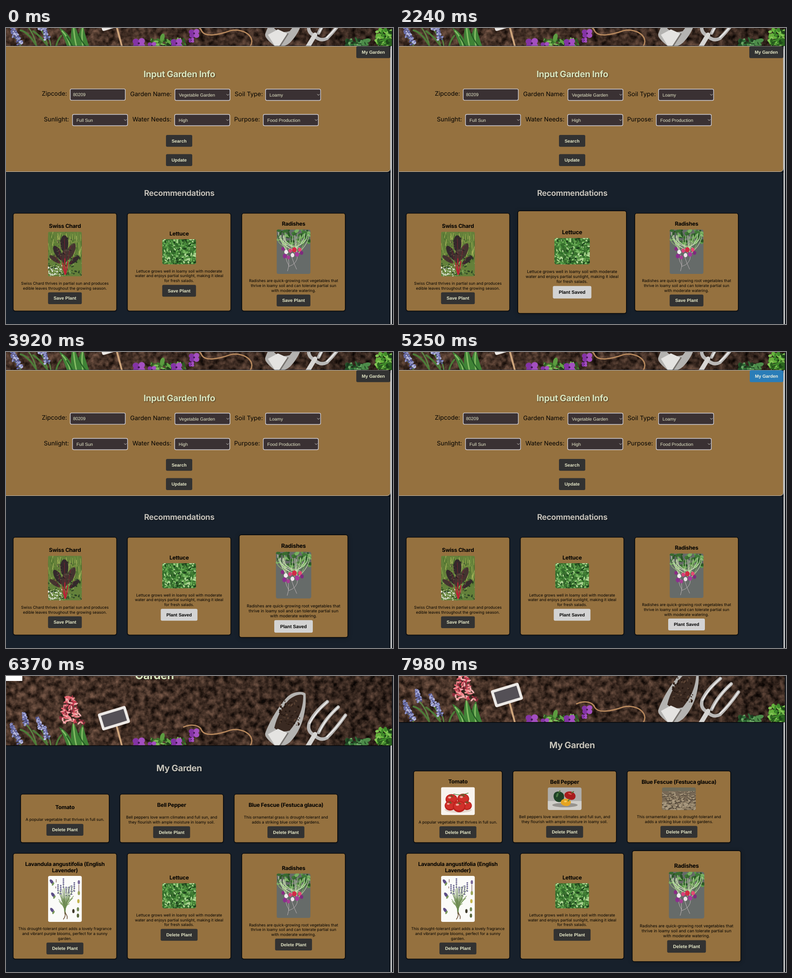
Animation of 854 by 656 pixels, one loop 8 s. Source, as an HTML page:

```html
<!DOCTYPE html>
<html lang="en">
<head>
<meta charset="utf-8">
<title>Garden planner</title>
<style>
  html, body { margin: 0; width: 100%; height: 100%; overflow: hidden; background: #17202b; }
  svg { display: block; }
  text { font-family: Inter, sans-serif; text-anchor: middle; text-rendering: geometricPrecision; }
  .head { font-weight: 700; letter-spacing: -.02em; }
  .glow { filter: drop-shadow(1px 1px 1px rgba(0, 0, 0, .55)); }
  .label { font-size: 13.45px; text-anchor: start; }
  .copy { font-size: 8.6px; }
  .field, .btn { font: 9.92px "Liberation Sans", Arial, sans-serif; }
  .field { text-anchor: start; }
  .btn { font-weight: 700; }
</style>
</head>
<body>
<svg width="854" height="656" viewBox="0 0 854 656">
  <filter id="soil" x="0" y="0" width="1" height="1" color-interpolation-filters="sRGB">
    <feTurbulence type="fractalNoise" baseFrequency=".075" numOctaves="4" seed="4"/>
    <feColorMatrix values=".8 0 0 0 -.15  .62 0 0 0 -.13  .52 0 0 0 -.115  0 0 0 0 1"/>
  </filter>
  <linearGradient id="shade"><stop stop-color="#6a4a38" stop-opacity=".22"/><stop offset="1" stop-color="#120b08" stop-opacity=".3"/></linearGradient>
  <defs id="defs"></defs>
  <g id="scene"></g>
</svg>
<script>
const LOOP = 8000, TICK = 70;
const BROWN = '#95713f', NAVY = '#17202b', DARK = '#323232', CREAM = '#e6e8c8', BLUE = '#2a7db8';
const PIC_W = 74.5;

// ---- drawing helpers ----
const rect = (x, y, w, h, fill, more = '') =>
  `<rect x="${x}" y="${y}" width="${w}" height="${h}" fill="${fill}" ${more}/>`;
const oval = (x, y, rx, ry, fill, turn = 0) =>
  `<ellipse cx="${x}" cy="${y}" rx="${rx}" ry="${ry}" fill="${fill}" transform="rotate(${turn} ${x} ${y})"/>`;
const shape = (d, fill, more = '') => `<path d="${d}" fill="${fill}" ${more}/>`;
const line = (d, color, width) =>
  shape(d, 'none', `stroke="${color}" stroke-width="${width}" stroke-linecap="round"`);
const text = (x, y, str, cls, fill = '#000', size = '') =>
  `<text x="${x}" y="${y}" class="${cls}" fill="${fill}"${size && ` style="font-size:${size}px"`}>${str}</text>`;

function scatter(n, seed, draw) {
  seed *= 7919;
  const next = () => (seed = seed * 16807 % 2147483647) / 2147483647;
  const rnd = (a, b) => +(a + (b - a) * next()).toFixed(1);
  const pick = list => list[Math.floor(next() * list.length)];
  return Array.from({ length: n }, (_, i) => draw(rnd, pick, i)).join('');
}
const blobs = (n, seed, [x, y, w, h], [min, max], colors) => scatter(n, seed, (rnd, pick) =>
  oval(rnd(x, x + w), rnd(y, y + h), rnd(min, max), rnd(min, max) * 0.6, pick(colors), rnd(0, 180)));

// ---- plant pictures, PIC_W wide ----
const pics = {
  chard: [99, rect(0, 0, 75, 99, '#64803a')
    + scatter(150, 5, (rnd, pick) => {
      const x = rnd(0, 75), y = rnd(0, 55);
      return line(`M${x} ${y + 14}l${rnd(-4, 4)} -14`, pick(['#a3b352', '#3f6a26', '#c8c96c', '#7c9c46', '#4c6e2c']), .9);
    })
    + blobs(110, 8, [0, 52, 75, 47], [1, 3.5], ['#33552a', '#5c8840', '#24381f', '#7fa25a', '#2b3f24'])
    + blobs(60, 3, [0, 74, 32, 25], [.8, 2.2], ['#f0f2ea', '#cfd8c4'])
    + [[36, 26, 9, 18, 0], [22, 47, 7, 18, -30], [50, 44, 8, 20, 25], [15, 61, 5, 14, -55], [58, 63, 5, 14, 50], [37, 54, 7, 16, 5]]
      .map(([x, y, a, b, r]) => oval(x, y, a, b, r % 2 ? '#453330' : '#34292c', r)
        + line(`M${x} ${y - b * .6}L38 92`, '#8e2231', .8)).join('')
    + blobs(60, 14, [20, 14, 36, 50], [.8, 2.4], ['#5a4440', '#2a2024', '#4d5a38'])
    + line('M32 70L37 94M44 66L39 94M37 60V95', '#c51f36', 2)],

  lettuce: [55.5, rect(0, 0, 75, 56, '#39702f')
    + blobs(420, 21, [0, 0, 75, 56], [1, 3.6], ['#2f6a2a', '#4f9440', '#78b860', '#b2da98', '#193f1b', '#5fa64c'])],

  radish: [98.5, rect(0, 0, 75, 99, '#666b69')
    + blobs(70, 18, [0, 0, 75, 32], [2, 6.5], ['#3f7a36', '#5c9a4a', '#2b5628', '#79b163', '#386a30', '#5a6659'])
    + scatter(24, 17, (rnd, pick) => {
      const x = rnd(0, 75), y = rnd(6, 24);
      return line(`M${x} ${y}Q${x} 32 ${rnd(18, 54)} ${rnd(40, 54)}`, pick(['#b9d79e', '#8ebb70', '#d3e4c0', '#4c8040']), 1.2);
    })
    + line('M24 56Q30 75 24 92M33 60Q38 76 44 88M46 58Q46 76 27 82M20 62Q22 72 27 80', '#d9ccd0', .7)
    + [[14, 43, 3.5, '#8a2a86'], [21, 50, 4.2, '#f1e9ee'], [18, 59, 4.5, '#8c2f8e'], [30, 47, 4, '#d6417c'], [39, 45, 5, '#d22b46'],
      [45, 55, 4.6, '#a8389a'], [51, 45, 4, '#e44a74'], [35, 57, 4, '#f0e4ea'], [26, 62, 3.6, '#a73b92'], [55, 52, 3.6, '#7e2a7e']]
      .map(([x, y, r, c]) => oval(x, y, r, r * 1.15, c)).join('')],

  tomato: [62, rect(0, 0, 75, 62, '#f8f3ee') + oval(38, 50, 30, 7, '#e4d6cc')
    + [[49, 26, 13], [23, 27, 13], [57, 41, 11], [20, 41, 12], [40, 43, 14]].map(([x, y, r]) =>
      oval(x, y, r, r * .9, '#b9201c') + oval(x, y - 1, r * .85, r * .72, '#d0302a') + oval(x - 4, y - 4, r * .25, r * .16, '#f3a89c')
      + line(`M${x - 4} ${y - 8}L${x + 4} ${y - 6}M${x} ${y - 10}L${x + 1} ${y - 5}`, '#3c6a2a', 1.2)).join('')
    + line('M28 15Q42 20 60 13', '#4a7a34', 1.3)],

  pepper: [50, rect(0, 0, 75, 50, '#aeadaa') + rect(0, 30, 75, 20, '#d0cec9') + oval(38, 39, 28, 5, '#96938e')
    + shape('M14 14C18 6 34 8 36 18C37 28 30 34 22 32C14 30 11 20 14 14Z', '#1f4226')
    + shape('M38 13C44 6 58 8 61 17C63 26 54 30 46 26C38 24 35 17 38 13Z', '#a81c1c')
    + shape('M30 29C36 22 50 25 51 32C51 41 42 43 35 40C28 37 28 33 30 29Z', '#e6a41f')
    + oval(21, 17, 2, 5, '#4b7b45', 20) + oval(49, 14, 4, 1.5, '#dc5a4c', 20) + oval(39, 31, 3, 2, '#f6cd5c')
    + line('M25 11L27 7M53 12L57 9M45 30L48 26', '#527a36', 2)],

  fescue: [50, rect(0, 0, 75, 50, '#776855')
    + scatter(170, 31, (rnd, pick, i) => {
      const y = 8 + i / 4, r = 1.6 + i / 75, x = rnd(0, 75);
      return oval(x, y + r * .5, r * 1.2, r * .8, '#4a4034') + oval(x, y, r, r * .7, pick(['#9c8c72', '#8a7a62', '#aa9a80']));
    })
    + rect(0, 0, 75, 8, '#6d6a58')],

  lavender: [102, rect(0, 0, 75, 102, '#fbfbf8')
    + scatter(24, 9, rnd => line(`M38 82Q36 66 ${rnd(18, 58)} ${rnd(42, 62)}`, '#7c9a5e', 1.1))
    + scatter(13, 12, (rnd, pick, i) => {
      const x = 22 + i * 3, y = rnd(3, 26);
      return line(`M37 84Q36 55 ${x} ${y + 14}`, pick(['#6d8a52', '#8aa56c', '#54733f']), 1)
        + (i % 2 ? '' : [0, 4, 8, 12, 18].map(d => oval(x, y + d, 1.8, 1.7, '#6f6b94')).join(''));
    })
    + line('M37 80Q40 88 34 96M38 82Q44 90 42 95', '#6b5136', 1.6)
    + [[8, 13], [11, 42], [9, 76]].map(([x, y]) => oval(x, y, 3.2, 6, '#5d4f86', -35)
      + oval(x + 3, y + 5, 2, 4, '#7b9a5c', 30)).join('')
    + [[68, 14, '#7b6a9a'], [68, 38, '#9aa65a'], [67, 56, '#c2b44c'], [66, 74, '#6f8550'], [66, 88, '#59663a'], [56, 78, '#3e3a2a']]
      .map(([x, y, c]) => oval(x, y, 2.6, 4.5, c)).join('')
    + line('M18 8V14M17 24V27M68 20V34', '#866b62', 1.4)]
};

// ---- soil banner, its lower edge at y = 171 ----
const pansy = (x, y, s) => [[-5, -3], [5, -4], [-4, 4], [5, 4]].map(([a, b], i) =>
  oval(x + a * s, y + b * s, 5.5 * s, 5 * s, i % 2 ? '#a34fc0' : '#8434a5')).join('') + oval(x, y, 1.8 * s, 1.8 * s, '#40184f');
const muscari = (x, y, turn) => `<g transform="translate(${x} ${y}) rotate(${turn})">`
  + scatter(44, x + 40, (rnd, pick, i) => oval(rnd(-5, 5) * (.5 + i / 50), -14 + i * .65, 2.4, 2, pick(['#8f93c6', '#b5b8df', '#6d70ac', '#4f528a'])))
  + '</g>';

const banner = rect(0, -130, 852, 302, '#3c2a21', 'filter="url(#soil)"') + rect(0, -130, 852, 302, 'url(#shade)')
  // muscari and leaves
  + line('M42 122Q62 140 68 175M72 130Q88 145 92 175M18 150Q30 160 33 175M90 146Q98 155 99 175', '#5c8444', 3)
  + line('M70 175Q50 140 32 136M95 175Q76 148 60 138M110 175Q112 160 122 148', '#4c7c38', 4)
  + muscari(42, 112, -12) + muscari(16, 136, -18) + muscari(74, 122, -20) + muscari(88, 143, -15) + muscari(26, 154, -25)
  // pink hyacinth
  + shape('M136 176C128 152 122 138 117 130C132 138 138 146 144 158C142 140 146 128 148 118C154 130 158 140 160 150C162 138 166 130 170 124C174 146 180 160 185 176Z', '#3f8336')
  + line('M124 138Q138 152 142 174M149 124Q150 150 156 174M169 132Q166 150 170 174', '#86bd66', 3)
  + line('M134 150Q142 162 148 174M160 144Q164 158 178 174', '#245a24', 2.5)
  + scatter(90, 41, (rnd, pick, i) => {
    const w = 7 + i * .27;
    return oval(138 + i * .12 + rnd(-w, w), 63 + i * .66, rnd(3, 6), 1.9, pick(['#e2616d', '#f08d92', '#c93f52', '#f4b0b0', '#8f2c3c']), rnd(0, 180));
  })
  // sign
  + line('M243 124L257 176', '#cfa67c', 4)
  + '<g transform="rotate(-17 238 110)">' + rect(206, 91, 64, 39, '#ece9e6', 'rx="4"') + rect(212, 97, 52, 27, '#545056') + '</g>'
  // pansies
  + blobs(90, 19, [322, 156, 74, 20], [2, 6], ['#3f7a2c', '#62a544', '#2c5a22', '#82bf5c', '#1f3f1a'])
  + oval(345, 152, 5, 9, '#5c9c40', 15)
  + pansy(293, 165, 1.3) + pansy(376, 165, 1.2) + pansy(322, 170, .9) + pansy(415, 143, 1.1) + pansy(409, 158, .6)
  // string
  + line('M392 130C410 122 428 126 432 138C440 152 470 146 495 137C525 130 556 152 536 176', '#b98a5e', 2.8)
  // trowel
  + shape('M620 64C634 50 655 50 661 56C664 92 654 134 630 160C618 174 602 174 594 172C582 162 570 152 572 144C582 116 602 84 620 64Z', '#b4b3b1')
  + shape('M624 70C638 58 652 56 656 60C656 92 644 116 626 138C612 142 600 140 592 132C598 106 610 86 624 70Z', '#3a2a22')
  + blobs(90, 29, [604, 72, 44, 56], [1, 3.5], ['#2c1d16', '#5a4334', '#3b2a20', '#21150f'])
  + shape('M578 146L600 134L622 144L604 172H594Z', '#e4e3e1')
  + line('M604 172L622 144', '#77736f', 3)
  // fork
  + line('M709 74Q680 98 669 122Q664 140 680 148M733 86Q704 112 690 142M749 104Q728 134 708 154Q694 162 680 148', '#b9b8b7', 7.5)
  + line('M709 74Q682 98 670 122M733 86Q706 110 692 140M749 104Q728 134 708 152', '#eeedec', 2.5)
  + line('M682 146L664 176', '#d6d5d3', 10)
  // right-hand plants
  + blobs(44, 55, [750, 156, 48, 18], [3, 8], ['#2f6a36', '#4d8c4a', '#245428', '#6ba666', '#1b3d20'])
  + blobs(80, 61, [818, 134, 34, 38], [3, 7], ['#3f8a2a', '#65b23c', '#2c6620', '#82c654', '#1d4618'])
  + rect(0, -8, 36, 36, '#fff')
  + text(327.5, 24, 'Garden', 'head glow', '#d9e6bd', 25)
  + rect(723, -14, 68, 26.5, '#d6b48c', 'rx="3"') + text(757, 4, 'Home', 'btn', '#ead8b8');

document.getElementById('defs').innerHTML =
  `<clipPath id="land"><path d="M0 -130H852V171H0Z"/></clipPath><g id="banner" clip-path="url(#land)">${banner}</g>`
  + Object.entries(pics).map(([id, [h, art]]) =>
    `<clipPath id="c-${id}">${rect(0, 0, PIC_W, h, '#000', 'rx="4"')}</clipPath><g id="${id}" clip-path="url(#c-${id})">${art}</g>`).join('');

// ---- page parts ----
function button(cx, y, label, w, fill = DARK, ink = CREAM) {
  return rect(cx - w / 2, y, w, 26.3, fill, 'rx="3"') + text(cx, y + 16.6, label, 'btn', ink);
}
const SAVE = ['Save Plant', 74.5], SAVE_HOT = [...SAVE, BLUE], SAVED = ['Plant Saved', 81, '#d3d3d3', '#000'],
  DELETE = ['Delete Plant', 81.5];

const plant = (cx, w, title, pic, copy) => ({ cx, w, title: title.split('|'), pic, copy: copy.split('|') });
const chard = plant(130, 229, 'Swiss Chard', 'chard',
  'Swiss Chard thrives in partial sun and produces|edible leaves throughout the growing season.');
const lettuce = plant(382, 229, 'Lettuce', 'lettuce',
  'Lettuce grows well in loamy soil with moderate|water and enjoys partial sunlight, making it ideal|for fresh salads.');
const radish = plant(634.5, 229, 'Radishes', 'radish',
  'Radishes are quick-growing root vegetables that|thrive in loamy soil and can tolerate partial sun|with moderate watering.');
const tomato = plant(130, 196, 'Tomato', 'tomato', 'A popular vegetable that thrives in full sun.');
const pepper = plant(365.5, 229, 'Bell Pepper', 'pepper',
  'Bell peppers love warm climates and full sun, and|they flourish with ample moisture in loamy soil.');
const fescue = plant(617.7, 229, 'Blue Fescue (Festuca glauca)', 'fescue',
  'This ornamental grass is drought-tolerant and|adds a striking blue color to gardens.');
const lavender = plant(130, 229, 'Lavandula angustifolia (English|Lavender)', 'lavender',
  'This drought-tolerant plant adds a lovely fragrance|and vibrant purple blooms, perfect for a sunny|garden.');

const LOADED = { pepper: 6440, lavender: 6300, fescue: 6790, tomato: 7000 };
const picHeight = (p, t) => !LOADED[p.pic] || t >= LOADED[p.pic] ? pics[p.pic][0] : 0;
const bodyHeight = (p, t) => p.title.length * 14 + 15.5 + picHeight(p, t) + p.copy.length * 10.6 + 30;
const rowHeight = (row, t) => Math.max(...row.map(p => bodyHeight(p, t))) + 27.5;

function card(p, t, bottom, h, btn, grow = 0) {
  const { cx, w } = p, cy = bottom - h / 2, pic = picHeight(p, t);
  let y = cy + 3 - bodyHeight(p, t) / 2;
  let out = `<g transform="translate(${cx} ${cy}) scale(${1 + grow * .05}) translate(${-cx} ${-cy})">`
    + rect(cx - w / 2 + .4, cy - h / 2 + .4, w - .8, h - .8, BROWN,
      `rx="4.5" stroke="#05070a" stroke-width="1.4" style="filter:drop-shadow(0 1px ${1 + 3 * grow}px rgba(0,0,0,.25))"`);
  for (const s of p.title) { out += text(cx, y + 11.3, s, 'head', '#000', 12); y += 14; }
  y += 5.5;
  if (pic) out += `<use href="#${p.pic}" x="${cx - PIC_W / 2}" y="${y}"/>`;
  y += pic + 10;
  for (const s of p.copy) { out += text(cx, y + 8.4, s, 'copy'); y += 10.6; }
  return out + button(cx, y + 4, ...btn) + '</g>';
}

function field(labelX, x, y, label, value, isSelect = true) {
  let out = text(labelX, y + 16, label, 'label')
    + rect(x + .7, y + .7, 121.6, 25, '#3a3133', 'rx="3" stroke="#d2cfd6" stroke-width="1.4"')
    + text(x + (isSelect ? 9.5 : 7), y + 16.7, value, 'field', CREAM);
  if (isSelect) out += line(`M${x + 115} ${y + 12}l2.5 2.5l2.5 -2.5`, '#d8d8d0', 1);
  return out;
}

const frame = bottom => `<use href="#banner" y="${bottom - 171}"/>`
  + rect(0, bottom, 849, 660, NAVY) + rect(848.5, bottom, 3, 660, '#f4f4f4') + rect(851.5, -5, 3, 670, '#14181e')
  + rect(0, bottom - .5, 849, 1.5, '#05070a') + rect(847.2, bottom, 1.3, 660, '#05070a');

const form = rect(-20, 40.5, 868, 278, BROWN, 'rx="7" stroke="#c8c4bc"')
  + text(382.5, 108.5, 'Input Garden Info', 'head glow', '#dbe6bf', 19.5)
  + field(79, 141, 134.4, 'Zipcode:', '80209', false)
  + field(274, 372, 134.8, 'Garden Name:', 'Vegetable Garden')
  + field(504.5, 572, 134.8, 'Soil Type:', 'Loamy')
  + field(83.5, 146, 190.8, 'Sunlight:', 'Full Sun')
  + field(279, 371.5, 190.8, 'Water Needs:', 'High')
  + field(503.5, 567, 190.8, 'Purpose:', 'Food Production')
  + button(382, 237, 'Search', 58) + button(382, 279.6, 'Update', 58)
  + text(382.3, 372, 'Recommendations', 'head glow', '#c3c0ba', 17.6);

const ramp = (t, start) => Math.min(1, Math.max(0, (t - start + TICK) / (2 * TICK)));
const saveState = (t, hot, saved) => t >= saved ? SAVED : t >= hot ? SAVE_HOT : SAVE;
const BOTTOM = 627.5, GAP = 23;

function searchPage(t) {
  const h = rowHeight([chard, lettuce, radish], t);
  return frame(40) + rect(0, 318, 849, 2, '#05070a') + form
    + (t >= 5250 ? button(811, 40.5, 'My Garden', 74, BLUE, '#eef0e0') : button(810.5, 40.5, 'My Garden', 75))
    + card(chard, t, BOTTOM, h, SAVE)
    + card(lettuce, t, BOTTOM, h, saveState(t, 1330, 2240), ramp(t, 1260) - ramp(t, 2590))
    + card(radish, t, BOTTOM, h, saveState(t, 2940, 3920), ramp(t, 2590) - ramp(t, 4620));
}

// Rows grow upward as pictures load; the page stays anchored at its end.
function gardenPage(t) {
  const top = [tomato, pepper, fescue], low = [lavender, lettuce, radish];
  const lowH = rowHeight(low, t), topH = rowHeight(top, t);
  const topBottom = BOTTOM - lowH - GAP, start = topBottom - topH;
  return frame(start - 107.5)
    + text(382, start - 50.5, 'My Garden', 'head glow', '#c6c4bb', 19.5)
    + top.map(p => card(p, t, topBottom, topH, DELETE)).join('')
    + low.map(p => card(p, t, BOTTOM, lowH, DELETE, p === radish ? ramp(t, 7770) : 0)).join('');
}

const scene = document.getElementById('scene');
let shown = '';
function draw(now) {
  const t = Math.floor((now % LOOP + .01) / TICK) * TICK;
  const html = t < 6160 ? searchPage(t) : gardenPage(t);
  if (html !== shown) scene.innerHTML = shown = html;
}
const begin = performance.now();
function loop() {
  draw(performance.now() - begin);
  requestAnimationFrame(loop);
}
loop();
</script>
</body>
</html>
```
